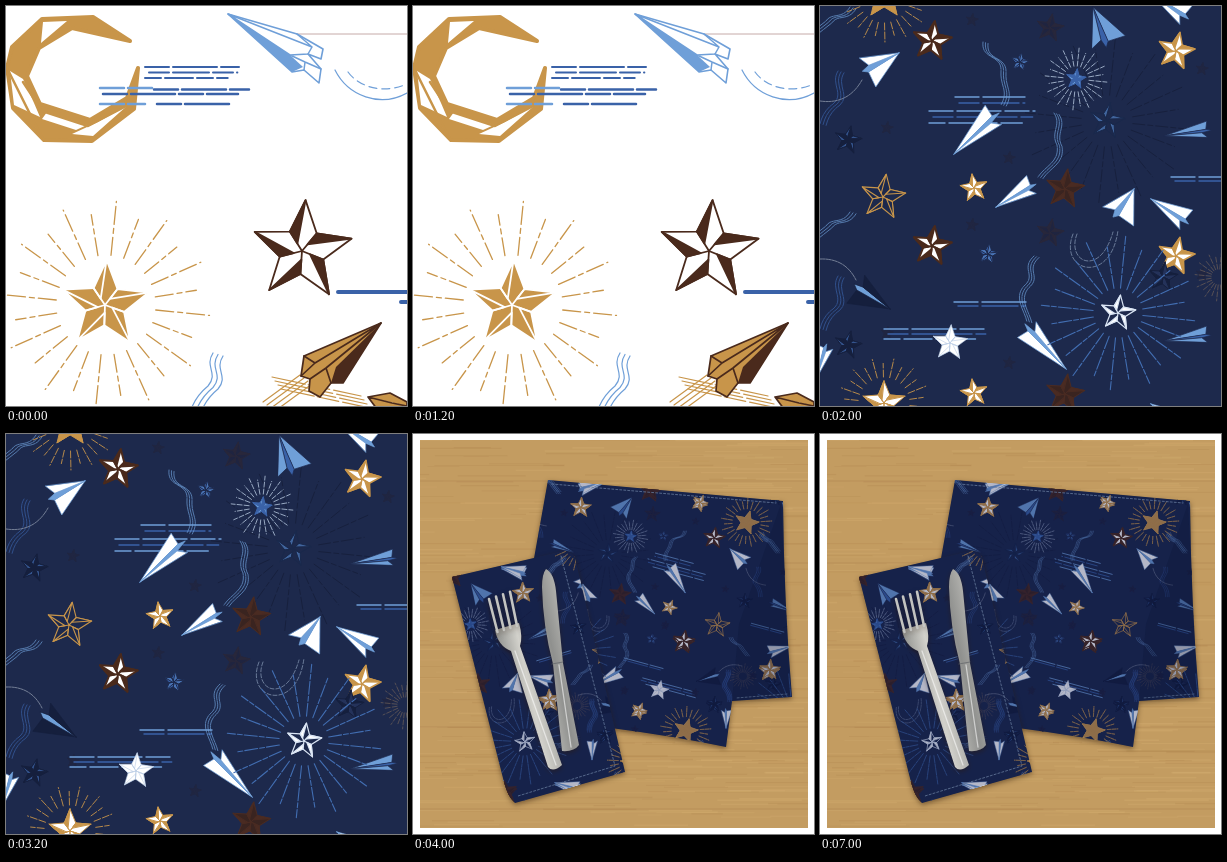
An HTML page with a canvas for the animation above (9 s loop, 401 by 400 pixels).

```html
<!DOCTYPE html>
<html lang="en">
<head>
<meta charset="utf-8">
<title>Stars and paper planes</title>
<style>
html, body { margin: 0; width: 100%; height: 100%; overflow: hidden; background: #fff; }
canvas { display: block; }
</style>
</head>
<body>
<canvas id="stage" width="401" height="400"></canvas>
<script>
const ctx = document.getElementById('stage').getContext('2d');
const GOLD = '#c8954a', BROWN = '#4a2a1c', SKY = '#6f9fd8', BLUE = '#3a62a8',
  NAVY = '#1d294c', INK = '#151f3d', WHITE = '#fff';
const REPEAT = 205, TILE = 2 * REPEAT - 4;
ctx.lineJoin = ctx.lineCap = 'round';

function shape(d, fill, line, width = 1, dash = []) {
  const path = new Path2D(d);
  ctx.setLineDash(dash);
  if (fill) { ctx.fillStyle = fill; ctx.fill(path); }
  if (line) { ctx.strokeStyle = line; ctx.lineWidth = width; ctx.stroke(path); }
}
const poly = (points, ...style) => shape('M' + points.join('L') + 'Z', ...style);
const stroke = (d, color, width, dash) => shape(d, null, color, width, dash);

function fillStage(color) {
  ctx.fillStyle = color;
  ctx.fillRect(0, 0, 401, 400);
}

function at(x, y, draw) {
  ctx.save();
  ctx.translate(x, y);
  draw();
  ctx.restore();
}

function shadowed(draw) {
  ctx.save();
  ctx.shadowColor = 'rgba(45,25,10,.5)';
  ctx.shadowBlur = 5;
  ctx.shadowOffsetY = 2;
  draw();
  ctx.restore();
}

// Folded star: each arm carries a thin dark fold that runs towards the middle like a pinwheel.
function star(x, y, r, turn, light, dark = light, line = dark, width = 1) {
  const point = (radius, i) => {
    const a = (turn - 90 + i * 72) * Math.PI / 180;
    return [x + radius * Math.cos(a), y + radius * Math.sin(a)];
  };
  const arms = [0, 1, 2, 3, 4];
  poly(arms.flatMap(i => [point(r, i), point(r * 0.45, i + 0.5)]), light, line, width);
  for (const i of arms) {
    const notch = point(r * 0.45, i - 0.5);
    poly([point(r, i), notch, point(r * 0.17, i - 0.5)], dark, line, width);
    poly([notch, [x, y]], null, line, width);
  }
}

// Dart from its nose to the middle of its tail, with the given wing span.
function plane(x, y, tailX, tailY, span, light = WHITE, dark = SKY, line = SKY) {
  const dx = tailX - x, dy = tailY - y, length = Math.hypot(dx, dy);
  const p = (along, side) => [
    x + dx * along - dy / length * side * span,
    y + dy * along + dx / length * side * span
  ];
  const nose = [x, y];
  poly([nose, p(1, -0.5), p(0.95, 0)], light, line, 0.7);
  poly([nose, p(0.95, 0), p(1.08, 0.12), p(0.85, 0.17)], dark, line, 0.7);
  poly([nose, p(0.85, 0.17), p(0.96, 0.5)], light, line, 0.7);
}

function rays(x, y, from, to, count, color, width, dash, turn = 0.1) {
  for (let i = 0; i < count; i++) {
    const a = turn + i * 2 * Math.PI / count, c = Math.cos(a), s = Math.sin(a);
    const end = to * (i % 2 ? 0.88 : 1);
    stroke(`M${x + from * c} ${y + from * s}L${x + end * c} ${y + end * s}`, color, width, dash);
  }
}

function streaks(x, y, length, rows, gap, colors, width) {
  for (let i = 0; i < rows; i++)
    stroke(`M${x + i % 2 * 4} ${y + i * gap}h${length * (1 - 0.06 * i)}`,
      colors[i % colors.length], width, [24 - i * 4, 4, 44 - i * 8, 4]);
}

function ribbon(d, color, width, gap, dash) {
  for (let i = 0; i < 3; i++) at(i * gap, i * gap * 0.3, () => stroke(d, color, width, dash));
}

function moon() {
  shape('M124 35L87 11L36 13L6 41L1 62L7 102L38 134L86 135L128 103L132 62L121 92L84 114L34 98L21 70L33 42L66 22Z', GOLD, GOLD, 4);
  shape('M37 16L61 15L35 37ZM4 65L17 73L28 97L34 111L8 99ZM41 106L81 119L70 124L36 113ZM92 116L122 99L87 130L66 128Z', WHITE);
  stroke('M6 44L1 62L24 108L38 134M17 76L36 105L82 120L128 96', GOLD, 2.5);
}

function bluePlane() {
  shape('M222 8L291 28L317 43L315 53L302 48L315 63L313 77L298 64L286 66Z', WHITE, SKY, 1.6);
  shape('M222 8L286 66L297 61L284 49Z', SKY);
  stroke('M222 8L306 41L291 28M222 8L284 49L302 48L306 41M284 49L299 56L315 63M299 56L298 64', SKY, 1.5);
}

function goldPlane() {
  shape('M375 317L298 350L295 370L304 373L303 385L314 391L325 377L337 377Z', GOLD, BROWN, 1.7);
  shape('M375 317L330 361L325 377L337 377Z', BROWN);
  stroke('M375 317L309 357L298 350M309 357L295 370M375 317L320 362L304 373M320 362L325 377', BROWN, 1.7);
}

function motifs() {
  fillStage(WHITE);
  moon();
  streaks(139, 61, 94, 3, 5.5, [BLUE], 2);
  streaks(94, 82, 52, 1, 0, [SKY], 2.5);
  streaks(148, 83.5, 95, 1, 0, [BLUE], 2.5);
  streaks(97, 88, 135, 1, 0, [BLUE], 2.5);
  streaks(94, 98, 45, 1, 0, [SKY], 2.5);
  streaks(151, 98, 76, 1, 0, [BLUE], 2.5);

  stroke('M292 28H401', '#c5aaa8', 1);
  bluePlane();
  stroke('M329 64C342 90 374 102 401 87', SKY, 1.2);
  stroke('M342 66C352 80 376 89 401 78', SKY, 1.2, [8, 5]);

  rays(100, 299, 50, 104, 24, GOLD, 1.3, [18, 4, 5, 4]);
  star(99, 299, 45, 2, GOLD, GOLD, WHITE, 1.8);
  star(296, 245, 51, 4, WHITE, BROWN, BROWN, 1.8);
  stroke('M332 286H401M395 296H401', BLUE, 4);

  for (let i = 0; i < 4; i++) {
    at(i * 3, i * 4, () => stroke('M266 371L355 390', GOLD, 1.2, [34, 3, 22, 4]));
    at(i * 4, i * 3, () => stroke('M257 396L294 369', GOLD, 1.2));
  }
  goldPlane();
  shape('M362 391L384 387L401 396V403H371ZL386 397L401 400', GOLD, BROWN, 1.7);
  ribbon('M207 347C198 361 213 367 202 380Q191 389 186 401', SKY, 1.2, 5);
}

// The part of the print that repeats down the cloth.
function repeat() {
  star(112, 35, 20, 8, WHITE, BROWN, BROWN, 2);
  star(356, 45, 19, 12, WHITE, GOLD, GOLD, 1.5);
  star(154, 182, 14, -8, WHITE, GOLD, GOLD);
  star(245, 183, 20, 8, '#3a2420', '#4a2b22', '#4a2b22');
  star(230, 22, 14, 10, '#1f2440', '#28273b');
  star(28, 134, 14, 12, INK, '#34548d', INK);
  for (const [x, y] of [[152, 14], [67, 122], [189, 152], [382, 63]]) star(x, y, 6, 8, '#202642');
  plane(344, 130, 388, 123, 16, SKY, BLUE, NAVY);
  plane(331, 193, 367, 214, 23);
  ribbon('M18 65C10 78 25 88 13 98Q3 105 0 118', BLUE, 0.7, 3, [9, 1]);
  ribbon('M30 206C22 219 12 211 6 220L-8 231', SKY, 0.7, 3, [9, 1]);
}

function pattern() {
  rays(287, 115, 26, 82, 24, '#17203d', 1, [12, 3, 5, 3]);
  for (const y of [-REPEAT, 0, REPEAT]) at(0, y, repeat);

  for (const [color, y] of [[GOLD, 0], [WHITE, TILE]]) {
    rays(64, y - 9, 26, 45, 26, GOLD, 0.9, [7, 2]);
    star(64, y - 9, 22, 0, color, GOLD);
  }
  rays(256, 73, 13, 31, 24, '#b8c9e0', 0.8, [5, 2]);
  star(256, 73, 10, 8, BLUE, SKY, BLUE);
  star(200, 56, 10, 8, '#4a74b5', BLUE, NAVY);
  star(168, 248, 11, 8, '#4a74b5', BLUE, NAVY);
  star(287, 115, 18, 10, NAVY, '#41659d', '#19284b');
  star(343, 271, 15, 8, '#24325a', INK);
  star(63, 191, 23, 8, NAVY, NAVY, GOLD, 1.1);

  const tones = [SKY, BLUE];
  streaks(135, 91, 70, 2, 6, tones, 1.4);
  streaks(109, 105, 106, 3, 6, tones, 1.4);
  streaks(134, 296, 72, 2, 4, tones, 1.4);
  streaks(64, 323, 104, 3, 5, tones, 1.4);
  streaks(351, 171, 60, 2, 4, tones, 1.4);

  ribbon('M163 36C161 54 182 48 181 65C180 81 189 84 181 99', SKY, 0.7, 2.5, [8, 1]);
  ribbon('M234 107C242 119 230 126 237 139C240 156 225 160 218 171', SKY, 0.7, 2.5, [8, 1]);
  ribbon('M214 250C200 263 217 269 204 280C193 292 205 305 207 316', SKY, 0.7, 2.5, [8, 1]);
  stroke('M253 228C238 266 291 280 298 224M257 228C246 256 280 272 293 226', '#8da0bb', 0.7, [4, 2]);
  stroke('M0 95Q28 99 42 74M0 253Q25 252 36 274', '#8993a7', 0.8, [5, 1]);

  plane(134, 148, 174, 108, 25);
  plane(176, 201, 212, 178, 20);
  plane(79, 47, 47, 67, 33);
  plane(273, 1, 289, 37, 36, SKY, BLUE, NAVY);
  plane(314, 183, 298, 211, 36);
  plane(70, 303, 35, 283, 33, INK, SKY, INK);
  plane(246, 363, 206, 323, 24);
  plane(-4, 373, 4, 340, 18);

  rays(298, 307, 25, 77, 24, '#426eb2', 1.1, [13, 2, 5, 2]);
  star(298, 307, 18, 8, NAVY, WHITE, '#d9e4f3', 1.2);
  star(130, 337, 18, 4, WHITE, WHITE, '#b9cbe4', 0.6);
  rays(399, 271, 8, 24, 24, '#655a57', 0.8, [5, 2]);
}

function cloth() {
  fillStage(NAVY);
  pattern();
}

function wood() {
  let seed = 7;
  const random = () => (seed = seed * 16807 % 2147483647) / 2147483647;
  ctx.save();
  ctx.beginPath();
  ctx.rect(7, 6, 388, 388);
  ctx.clip();
  fillStage('#c39c61');
  for (let i = 0; i < 400; i++) {
    ctx.fillStyle = random() < 0.5 ? 'rgba(145,98,48,.12)' : 'rgba(228,190,132,.16)';
    ctx.fillRect(random() * 400 - 40, random() * 400, 20 + random() * 110, 0.6 + random());
  }
  for (let y = 47; y < 394; y += 82) stroke(`M7 ${y}H395`, 'rgba(130,85,40,.25)', 0.8);
  ctx.restore();
}

// A piece of the printed cloth, laid out with an affine map.
function napkin(outline, map, seam) {
  shadowed(() => shape(outline, NAVY));
  ctx.save();
  ctx.clip(new Path2D(outline));
  ctx.save();
  ctx.transform(...map);
  for (const x of [-TILE, 0, TILE])
    for (const y of [-TILE, 0, TILE]) at(x, y, pattern);
  ctx.restore();
  shape(outline, 'rgba(8,18,72,.3)');
  stroke(seam, '#65799b', 0.8, [2, 2]);
  ctx.restore();
}

function cutlery() {
  const steel = ctx.createLinearGradient(75, 210, 165, 190);
  ['#777977', '#d2d1cb', '#8f908e', '#c9c8c3'].forEach((c, i) => steel.addColorStop(i / 3, c));
  shadowed(() => {
    shape('M82 196Q85 212 98 217L135 333Q140 339 149 331L107 212Q110 203 106 189Z', steel);
    for (let i = 0; i < 4; i++)
      stroke(`M${76 + i * 7} ${165 - i * 2.4}L${84.5 + i * 6.5} ${198 - i * 2}`, '#c4c5c2', 2.6);
    shape('M133 135Q141 139 143 157L150 229L166 311Q161 318 149 317L140 230Q130 193 129 153Q129 140 133 135Z', steel);
  });
  stroke('M146 231L158 313M102 217L143 331', 'rgba(255,255,255,.55)', 1.3);
  stroke('M139 230L150 228', '#66696c', 0.8);
}

function tableSetting() {
  fillStage(WHITE);
  wood();
  napkin('M135 46L370 67Q371 170 379 263L319 267L313 313Q260 302 198 294L120 130Z',
    [-0.54, -0.146, -0.15, 0.512, 366.8, 102.5], 'M139 50L363 69M374 260L323 264');
  shape('M319 267L326 190L368 70L377 261Z', 'rgba(8,18,48,.2)');
  napkin('M39 143L151 117Q162 119 163 128L212 338L102 369Q95 363 91 348Z',
    [0.56, -0.167, 0.132, 0.532, -95.4, 194.4], 'M148 122L202 332L105 362');
  cutlery();
}

let shown;
function tick() {
  const t = performance.now() % 9000;
  const scene = t < 2000 ? motifs : t < 4000 ? cloth : tableSetting;
  if (scene !== shown) {
    shown = scene;
    scene();
  }
  requestAnimationFrame(tick);
}
tick();
</script>
</body>
</html>
```
